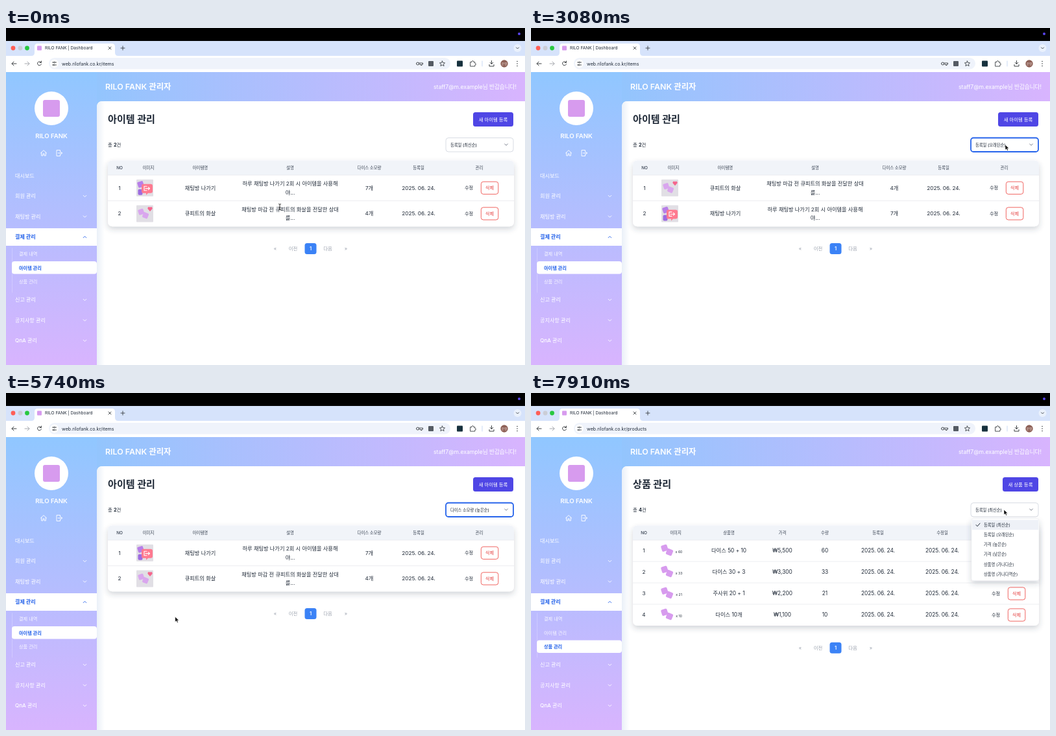
Recreate the animation shown at these times as an HTML page. Size 800 by 520 pixels, loop 8 s.

```html
<!DOCTYPE html>
<html lang="ko">
<head>
<meta charset="utf-8">
<style>
html, body { margin: 0; width: 100%; height: 100%; overflow: hidden; background: #fff; }
svg { display: block; width: 800px; height: 520px; }
text { font-family: Inter, 'Noto Sans CJK KR', 'Noto Sans CJK', sans-serif; white-space: pre; }
.line { fill: none; stroke-linecap: round; stroke-linejoin: round; }
</style>
</head>
<body>
<svg viewBox="0 0 800 520">
  <defs>
    <linearGradient id="side" x2="0" y2="1"><stop stop-color="#90c7ff"/><stop offset="1" stop-color="#d8b4fe"/></linearGradient>
    <linearGradient id="head"><stop stop-color="#93c5fd"/><stop offset="1" stop-color="#d8b4fe"/></linearGradient>
    <linearGradient id="edge"><stop stop-color="#eaf0f8"/><stop offset="1" stop-color="#fff"/></linearGradient>
    <filter id="soft" x="-10%" y="-10%" width="120%" height="130%"><feDropShadow dx="0" dy="4" stdDeviation="4" flood-color="#334155" flood-opacity=".22"/></filter>
  </defs>
  <g id="screen"></g>
  <g id="cursor"></g>
</svg>
<script>
const LOOP = 8000;
const BRAND = 'RILO FANK', HOST = 'web.rilofank.co.kr';
const INK = '#1f2937', GRAY = '#9ca3af', BLUE = '#2563eb', LILAC = '#d79bee';

// Drawing helpers; text is placed by its vertical middle.
const text = (s, x, y, size, fill = INK, weight = 400, anchor = 'start') =>
  `<text x="${x}" y="${y + size * .36}" font-size="${size}" fill="${fill}" font-weight="${weight}" text-anchor="${anchor}">${s}</text>`;
const mid = (s, x, y, size, fill, weight) => text(s, x, y, size, fill, weight, 'middle');
const rect = (x, y, w, h, fill, r = 0, extra = '') =>
  `<rect x="${x}" y="${y}" width="${w}" height="${h}" rx="${r}" fill="${fill}" ${extra}/>`;
const circle = (x, y, r, fill) => `<circle cx="${x}" cy="${y}" r="${r}" fill="${fill}"/>`;
const line = (d, color, width = 1) => `<path class="line" d="${d}" stroke="${color}" stroke-width="${width}"/>`;
const chevron = (x, y, color, flip = 1, s = 2.3) =>
  line(`M${x - s} ${y - flip * s / 2}l${s} ${flip * s}l${s} ${-flip * s}`, color, .9);

function browser(path) {
  const dark = '#3c4043';
  return rect(0, 0, 800, 20, '#000') + circle(791, 9, 2, '#5b46f0')
    + rect(0, 20, 800, 24, '#d6e3fb') + rect(0, 43, 800, 25, '#fff')
    + '<path d="M39 43q5 0 5-5v-9q0-5 5-5h114q5 0 5 5v9q0 5 5 5z" fill="#fff"/>'
    + circle(11, 31, 3.4, '#ff5f57') + circle(22, 31, 3.4, '#cbcdd6') + circle(32.5, 31, 3.4, '#28c840')
    + rect(48, 27.5, 7, 7, LILAC, 1) + text(BRAND + ' | Dashboard', 60, 31, 6.6)
    + line('M158 29l4 4m0-4l-4 4', dark, .9) + line('M177 31h6m-3-3v6', dark, .9)
    + circle(788.5, 31, 6, '#eaf1fd') + chevron(788.5, 31, dark, 1, 2)
    + line('M16 55h-7m3-3l-3 3l3 3', dark) + line('M29 55h7m-3-3l3 3l-3 3', '#a5a8ad')
    + line('M54 53a3 3 0 1 0 .4 2.8M54.4 51v2.4h-2.4', dark)
    + rect(66, 46, 619, 17.5, '#eff3fb', 8.7) + circle(74.5, 55, 6.4, '#fff')
    + line('M71.5 53h2m2.6 0h1.5M71.5 57h1.5m2.6 0h2', dark, .9)
    + line('M73.6 53a1 1 0 1 0 2 0a1 1 0 1 0-2 0M73 57a1 1 0 1 0 2 0a1 1 0 1 0-2 0', dark, .8)
    + text(HOST + '/' + path, 86, 55, 7.1)
    + line('M632.5 55a2 2 0 1 0 4 0a2 2 0 1 0-4 0M636.5 54h6v2h-1.5v1.5h-1.5v-1.5h-3', dark, .9)
    + rect(651, 51, 8, 8, '#555b63', 1)
    + line('M672.5 51l1.2 2.6 2.9.3-2.2 1.9.7 2.8-2.6-1.5-2.6 1.5.7-2.8-2.2-1.9 2.9-.3z', dark, .9)
    + rect(695, 50.5, 9, 9, '#17313d', 1)
    + line('M716 52.5h2q0-2 1.4-2t1.4 2h2v2.2q1.5 0 1.5 1.2t-1.5 1.2v2h-6.8z', dark, .9)
    + line('M734 51v8', '#c9d9f5', 1)
    + line('M748.5 50.5v5m-2.3-2.2l2.3 2.3l2.3-2.3M745 56.5v2.5h7v-2.5', dark)
    + circle(768, 55, 5.7, '#8d6056') + mid('운영', 768, 55, 4.6, '#f4e6e2')
    + [51.5, 55, 58.5].map(y => circle(788, y, .8, dark)).join('');
}

function sidebar(page, hover) {
  let s = rect(0, 68, 140, 452, 'url(#side)') + circle(70, 124, 26, '#fff')
    + rect(57, 111, 26, 26, LILAC, 3) + mid(BRAND, 70, 167, 9.6, '#fff', 600)
    + line('M53.5 193l4.5-4.3l4.5 4.3m-7.8-1v5h2.3v-3h2v3h2.3v-5', '#fff', .9)
    + line('M83.5 191v-2.5h-5.5v9h5.5v-2.5M80.5 193h6m-2-2l2 2l-2 2', '#fff', .9)
    + rect(0, 309, 140, 27, '#fff') + line('M9.5 340v68', '#ffffff55', .7);
  const groups = [['대시보드', 228], ['회원 관리', 259.5], ['채팅방 관리', 291], ['결제 관리', 322.5],
    ['신고 관리', 419.5], ['공지사항 관리', 451], ['QnA 관리', 482.5]];
  groups.forEach(([name, y], i) => {
    const open = i === 3, color = open ? BLUE : '#fff';
    s += text(name, 14, y, 8.1, color, open ? 700 : 500);
    if (i) s += chevron(121.5, y, color, open ? -1 : 1);
  });
  [['결제 내역', 348], ['아이템 관리', 370, 'items'], ['상품 관리', 391.5, 'products']].forEach(([name, y, id]) => {
    const active = id === page, over = hover && id === 'products';
    if (active || over) s += rect(9, y - 10, 131, 19.5, '#fff', 4);
    s += text(name, 20, y, 7.2, active || over ? BLUE : '#ffffffe0', active ? 700 : 400);
  });
  return s;
}

const plainDice = (x, y, s, color) => [[0, 0], [.8, .65]].map(([dx, dy], i) =>
  rect(x + dx * s, y + dy * s, s, s, color, s * .2,
    `transform="rotate(${i ? 22 : -18} ${x + (dx + .5) * s} ${y + (dy + .5) * s})"`)).join('');

const exitPicture = y => rect(201, y - 13, 26, 26, '#e1dfe5', 1) + plainDice(203, y - 10, 9, '#b77ee8')
  + rect(203.5, y + 2, 7, 9, '#9c6be0', 2)
  + `<path d="M211 ${y - 6}h12q3 0 3 3v8q0 3-3 3h-4l-3 3v-3h-5q-2 0-2-3v-8q0-3 2-3z" fill="#ff7a90"/>`
  + line(`M217 ${y - 2.5}h-4v6.5h4M215 ${y + .8}h6.5m-2-2l2 2l-2 2`, '#fff', 1.1);
const heartPicture = y => rect(201, y - 13, 26, 26, '#e1dfe5', 1) + plainDice(204, y - 7, 8.5, '#d9a6ee')
  + `<path d="M222 ${y - 3.5}l-3.2-3.5a2 2 0 0 1 3.2-2.4a2 2 0 0 1 3.2 2.4z" fill="#f5658c"/>`;

const ITEMS = [
  { name: '채팅방 나가기', info: ['하루 채팅방 나가기 2회 시 아이템을 사용해', '야...'], cost: '7개', picture: exitPicture },
  { name: '큐피트의 화살', info: ['채팅방 마감 전 큐피트의 화살을 전달한 상대', '를...'], cost: '4개', picture: heartPicture }
];
const PRODUCTS = [['다이스 50 + 10', '₩5,500', 60], ['다이스 30 + 3', '₩3,300', 33],
  ['주사위 20 + 1', '₩2,200', 21], ['다이스 10개', '₩1,100', 10]];
const DATE = '2025. 06. 24.';
const PAGES = {
  items: {
    noun: '아이템', count: 2, rowHeight: 39.6, buttonX: 720, manageX: 729,
    columns: [['NO', 175], ['이미지', 219.5], ['아이템명', 299.5], ['설명', 438], ['다이스 소모량', 560], ['등록일', 636], ['관리', 729.5]],
    sorts: ['등록일 (최신순)', '등록일 (오래된순)', '다이스 소모량 (높은순)', '다이스 소모량 (낮은순)', '아이템명 (가나다순)'],
    row(i, y, sort) {
      const item = ITEMS[sort === 1 ? 1 - i : i];
      return item.picture(y) + mid(item.name, 299.5, y, 8.2) + mid(item.cost, 560, y, 8.2) + mid(DATE, 636, y, 8.2)
        + item.info.map((s, k) => mid(s, 438, y - 6.5 + k * 13.4, 8.2)).join('');
    }
  },
  products: {
    noun: '상품', count: 4, rowHeight: 33, buttonX: 727, manageX: 732,
    columns: [['NO', 174], ['이미지', 223], ['상품명', 305], ['가격', 387.5], ['수량', 453], ['등록일', 535], ['수정일', 634], ['관리', 732]],
    sorts: ['등록일 (최신순)', '등록일 (오래된순)', '가격 (높은순)', '가격 (낮은순)', '상품명 (가나다순)', '상품명 (가나다역순)'],
    row(i, y) {
      const [name, price, amount] = PRODUCTS[i];
      return plainDice(201, y - 9, 9.6, LILAC) + mid('x ' + amount, 228, y + 1.5, 5.2) + mid(name, 305, y, 8.3)
        + mid(price, 387.5, y, 8.3) + mid(amount, 453, y, 8.3) + mid(DATE, 535, y, 8.3) + mid(DATE, 634, y, 8.3);
    }
  }
};

function content(page, sort, focus) {
  const p = PAGES[page], bottom = 227 + p.count * p.rowHeight, pager = bottom + 34.3;
  let s = rect(140, 68, 660, 60, 'url(#head)') + text(BRAND + ' 관리자', 153, 90.5, 12.4, '#fff', 600)
    + text('staff7@m.example님 반갑습니다!', 787, 90.5, 8.6, '#fff', 400, 'end')
    + '<path d="M140 520V122q0-9 9-9H800V520z" fill="#fff"/>'
    + '<path d="M140 520V122q0-9 9-9h3V520z" fill="url(#edge)"/>'
    + text(p.noun + ' 관리', 157, 141, 15.1, INK, 700)
    + rect(p.buttonX, 130, 782 - p.buttonX, 22, '#4f46e5', 3.5)
    + mid(`새 ${p.noun} 등록`, (p.buttonX + 782) / 2, 141, 7.4, '#fff', 500)
    + text(`총 <tspan font-weight="700">${p.count}</tspan>건`, 157, 180, 7.4)
    + rect(678, 169.5, 104, 21.5, '#fff', 4, focus ? `stroke="${BLUE}" stroke-width="1.8"` : 'stroke="#cfd4dc" stroke-width=".8"')
    + text(p.sorts[sort], 685, 180.3, 6.25, INK, 500) + chevron(771, 180, '#6b7280')
    + rect(157, 204.5, 626, bottom - 204.5, '#fff', 7, 'filter="url(#soft)"')
    + '<path d="M157 227V211.500q0-7 7-7H776q7 0 7 7V227z" fill="#f1f4f9"/>'
    + p.columns.map(([name, x]) => mid(name, x, 215.7, 6.4, '#374151', 500)).join('');
  for (let i = 0; i < p.count; i++) {
    const top = 227 + i * p.rowHeight, y = top + p.rowHeight / 2, x = p.manageX;
    s += line(`M157 ${top}H783`, '#e5e7eb', .7) + mid(i + 1, p.columns[0][1], y, 8.2) + p.row(i, y, sort)
      + mid('수정', x - 15.5, y, 7.2)
      + rect(x + 3.3, y - 9.6, 26.5, 19.2, '#fff', 3.5, 'stroke="#ef5350" stroke-width=".9"')
      + mid('삭제', x + 16.5, y, 7.2, '#e53e3e');
  }
  s += rect(460.5, pager - 8.5, 18, 17, '#3b82f6', 3.5) + mid('1', 469.5, pager, 7.6, '#fff', 600);
  [['«', 415], ['이전', 442.5], ['다음', 496], ['»', 524]].forEach(([name, x]) => s += mid(name, x, pager, 7.4, GRAY));
  return s;
}

function menu(page, sort, lit) {
  const names = PAGES[page].sorts;
  return rect(679, 194, 104, names.length * 15.2 + 4.5, '#fff', 3, 'filter="url(#soft)" stroke="#e2e5ea" stroke-width=".5"')
    + names.map((name, i) => {
      const y = 203.5 + i * 15.2;
      return (i === lit ? rect(680, y - 7.5, 102, 15, '#eef1f7') : '')
        + (i === sort ? line(`M686 ${y}l2 2.2l4-4.6`, INK, 1) : '') + text(name, 698, y, 6.25);
    }).join('');
}

const CURSORS = {
  arrow: '<path d="M0-1V7l1.900-1.700 1.300 2.800 1.400-.6-1.300-2.800h2.500z" fill="#000" stroke="#fff" stroke-width=".6"/>',
  beam: line('M-1.500-4.500q1.500 0 1.500 1v7q0 1-1.500 1M1.500-4.500q-1.500 0-1.500 1M0 3.500q0 1 1.500 1M-1 .8h2', '#222', .9),
  hand: '<path d="M-2.500-3.500q1.200-1.200 1.800.3l.7 2.300 1-.2 1 .3 1 .3q1 .3 1 1.500v2l-.8 2h-4.200l-2.700-3.600q.3-1.200 1.500-.3l.4.4z" fill="#fff" stroke="#111" stroke-width=".8"/>'
};

// Pointer stops: time, x, y, and the shape shown from that time on.
const PATH = [[0, 422, 276, 'beam'], [70, 422, 276, 'arrow'], [540, 727, 181, 'arrow'], [1430, 727, 181, 'arrow'],
  [1750, 726, 219, 'arrow'], [2100, 726, 219, 'beam'], [2600, 726, 219, 'arrow'], [3100, 731, 181, 'arrow'],
  [3480, 731, 181, 'arrow'], [4300, 732, 235, 'arrow'], [5150, 732, 235, 'arrow'], [6050, 84, 388, 'hand'],
  [6800, 84, 388, 'arrow'], [7420, 729, 181, 'arrow'], [LOOP, 729, 181, 'arrow']];

function pointer(t) {
  const i = PATH.findIndex(stop => stop[0] > t), [t0, x0, y0, shape] = PATH[i - 1], [t1, x1, y1] = PATH[i];
  const u = (t - t0) / (t1 - t0), k = u * u * (3 - 2 * u);
  return { x: x0 + (x1 - x0) * k, y: y0 + (y1 - y0) * k, shape };
}

const within = (t, a, b) => t >= a && t < b;
const screen = document.getElementById('screen'), cursor = document.getElementById('cursor');
let shown = '';

function draw(t) {
  const at = pointer(t);
  const page = t < 6720 ? 'items' : 'products';
  const sort = t < 2100 || page === 'products' ? 0 : t < 4620 ? 1 : 2;
  const open = within(t, 630, 2100) || within(t, 3300, 4620) || t >= 7560;
  const focus = within(t, 2100, 3300) || within(t, 4620, 6720 - 400);
  const hover = at.shape === 'hand';
  const lit = at.y > 196 ? Math.floor((at.y - 196) / 15.2) : sort;
  const state = [page, sort, open, focus, hover, open && lit].join();
  if (state !== shown) {
    shown = state;
    screen.innerHTML = browser(page) + sidebar(page, hover) + content(page, sort, focus)
      + (open ? menu(page, sort, lit) : '')
      + (hover ? rect(-3, 508.5, 117, 15, '#dbe6fb', 3) + text(`https://${HOST}/products`, 3, 514, 6.2, '#3c4043') : '');
  }
  cursor.innerHTML = CURSORS[at.shape];
  cursor.setAttribute('transform', `translate(${at.x} ${at.y})`);
}

const start = performance.now();
function tick() {
  draw((performance.now() - start) % LOOP);
  requestAnimationFrame(tick);
}
tick();
</script>
</body>
</html>
```
